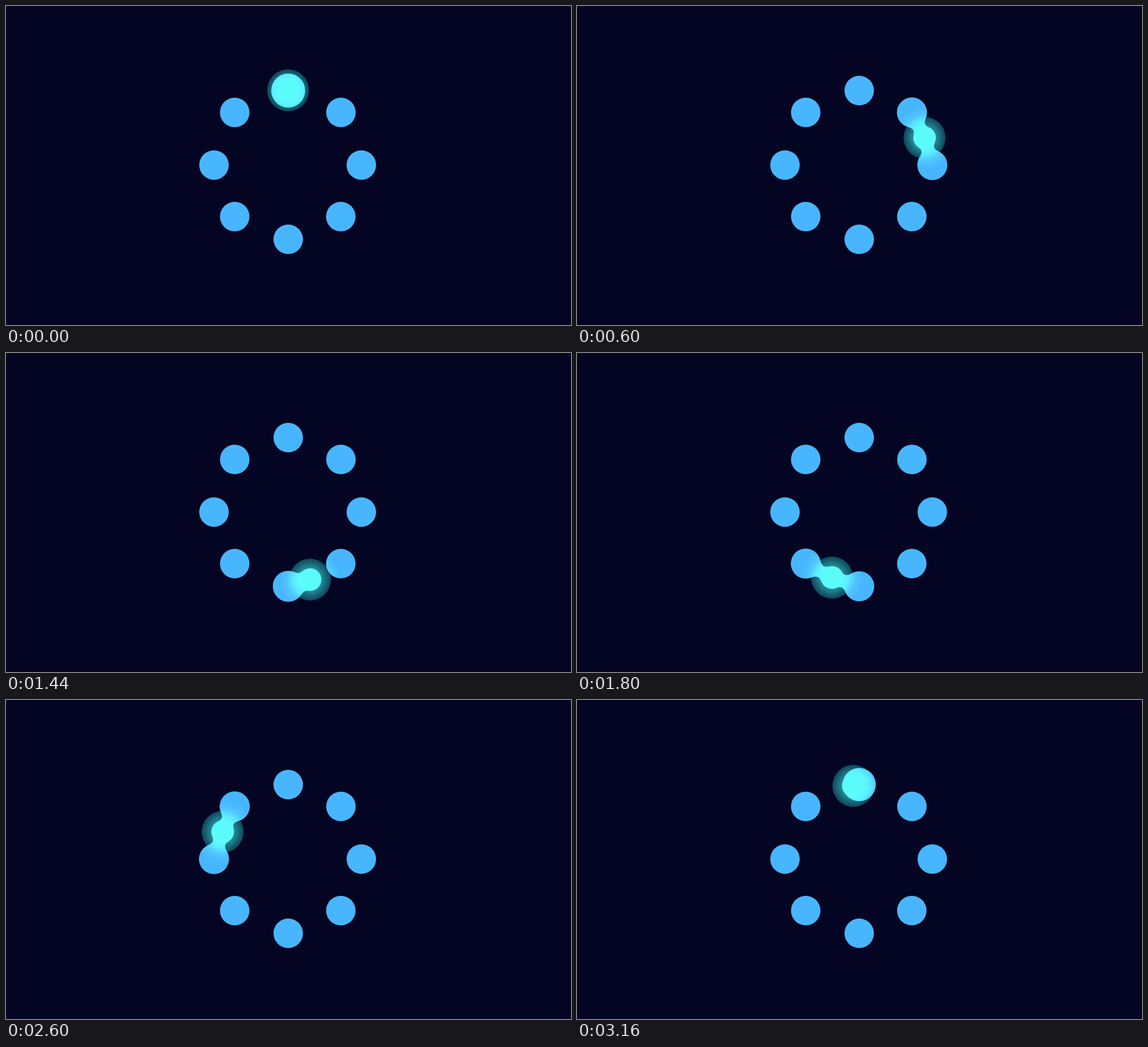
Animation, 997 px wide and 562 px high, one loop 3200 ms. Source, as an HTML page with a canvas:

```html
<!DOCTYPE html>
<html lang="en">
<head>
<meta charset="utf-8">
<title>Liquid loader</title>
<style>
html, body { margin: 0; width: 100%; height: 100%; overflow: hidden; background: #040522; }
canvas { display: block; }
</style>
</head>
<body>
<canvas id="stage" width="997" height="562"></canvas>
<script>
const ctx = document.getElementById('stage').getContext('2d');
const LOOP = 3200, STEP = 40, TAU = Math.PI * 2;
const DOT_R = 26, BALL_R = 20, GLOW_R = 37, SWELL = 4, REACH = 58;
const DOTS = [
  [498, 149], [591, 187.5], [627, 280.2], [590.8, 371],
  [498, 411], [403.6, 371], [367, 280.2], [403.6, 187.5]
];

const polar = ([x, y], a, r) => [x + Math.cos(a) * r, y + Math.sin(a) * r];
const dist = (p, q) => Math.hypot(p[0] - q[0], p[1] - q[1]);

function disc(c, r, fill) {
  ctx.fillStyle = fill;
  ctx.beginPath();
  ctx.arc(c[0], c[1], r, 0, TAU);
  ctx.fill();
}

function radial(c, r, stops) {
  const g = ctx.createRadialGradient(c[0], c[1], 0, c[0], c[1], r);
  for (const [at, color] of stops) g.addColorStop(at / r, color);
  return g;
}

// The ball's orbit dips inwards between neighbouring dots.
function ballAt(ms) {
  const turn = ms / LOOP;
  const slot = turn * 8;
  const off = 2 * Math.abs(slot - Math.round(slot));
  return polar([497.8, 280], turn * TAU - Math.PI / 2, 125 + 6.5 * (1 - off) ** 2);
}

// Liquid neck between two circles.
function bridge(c1, r1, c2, r2, fill) {
  const d = dist(c1, c2), v = 0.5;
  if (d <= Math.abs(r1 - r2) || d > REACH) return;
  let u1 = 0, u2 = 0;
  if (d < r1 + r2) {
    u1 = Math.acos((r1 * r1 + d * d - r2 * r2) / (2 * r1 * d));
    u2 = Math.acos((r2 * r2 + d * d - r1 * r1) / (2 * r2 * d));
  }
  const axis = Math.atan2(c2[1] - c1[1], c2[0] - c1[0]);
  const spread = Math.acos((r1 - r2) / d);
  const a1 = u1 + (spread - u1) * v;
  const a2 = Math.PI - u2 - (Math.PI - u2 - spread) * v;

  const side = s => {
    const p = polar(c1, axis + s * a1, r1), q = polar(c2, axis + s * a2, r2);
    const k = Math.min(1.2, dist(p, q) / (r1 + r2)) * Math.min(1, 2 * d / (r1 + r2));
    return [
      p,
      polar(p, axis + s * (a1 - Math.PI / 2), r1 * k),
      polar(q, axis + s * (a2 + Math.PI / 2), r2 * k),
      q
    ];
  };
  const a = side(1), b = side(-1);
  ctx.fillStyle = fill;
  ctx.beginPath();
  ctx.moveTo(...a[0]);
  ctx.bezierCurveTo(...a[1], ...a[2], ...a[3]);
  ctx.lineTo(...c2);
  ctx.lineTo(...b[3]);
  ctx.bezierCurveTo(...b[2], ...b[1], ...b[0]);
  ctx.lineTo(...c1);
  ctx.fill();
}

function draw(ms) {
  ctx.fillStyle = '#040522';
  ctx.fillRect(0, 0, 997, 562);

  const ball = ballAt(ms);
  disc(ball, GLOW_R, radial(ball, GLOW_R, [
    [0, 'rgba(64,245,242,.7)'], [20, 'rgba(64,245,242,.56)'], [37, 'rgba(48,240,240,.28)']
  ]));

  const liquid = radial(ball, 54, [
    [0, '#58fcf8'], [18, '#5cfcfc'], [29, '#5cecff'], [40, '#52c6ff'], [54, '#48b6ff']
  ]);
  for (const dot of DOTS) {
    const near = Math.max(0, 1 - dist(dot, ball) / REACH);
    const r = DOT_R + SWELL * near;
    disc(dot, r, liquid);
    bridge(dot, r, ball, BALL_R, liquid);
  }
  disc(ball, BALL_R, liquid);
}

function tick() {
  draw(Math.floor(performance.now() % LOOP / STEP) * STEP);
  requestAnimationFrame(tick);
}
tick();
</script>
</body>
</html>
```
